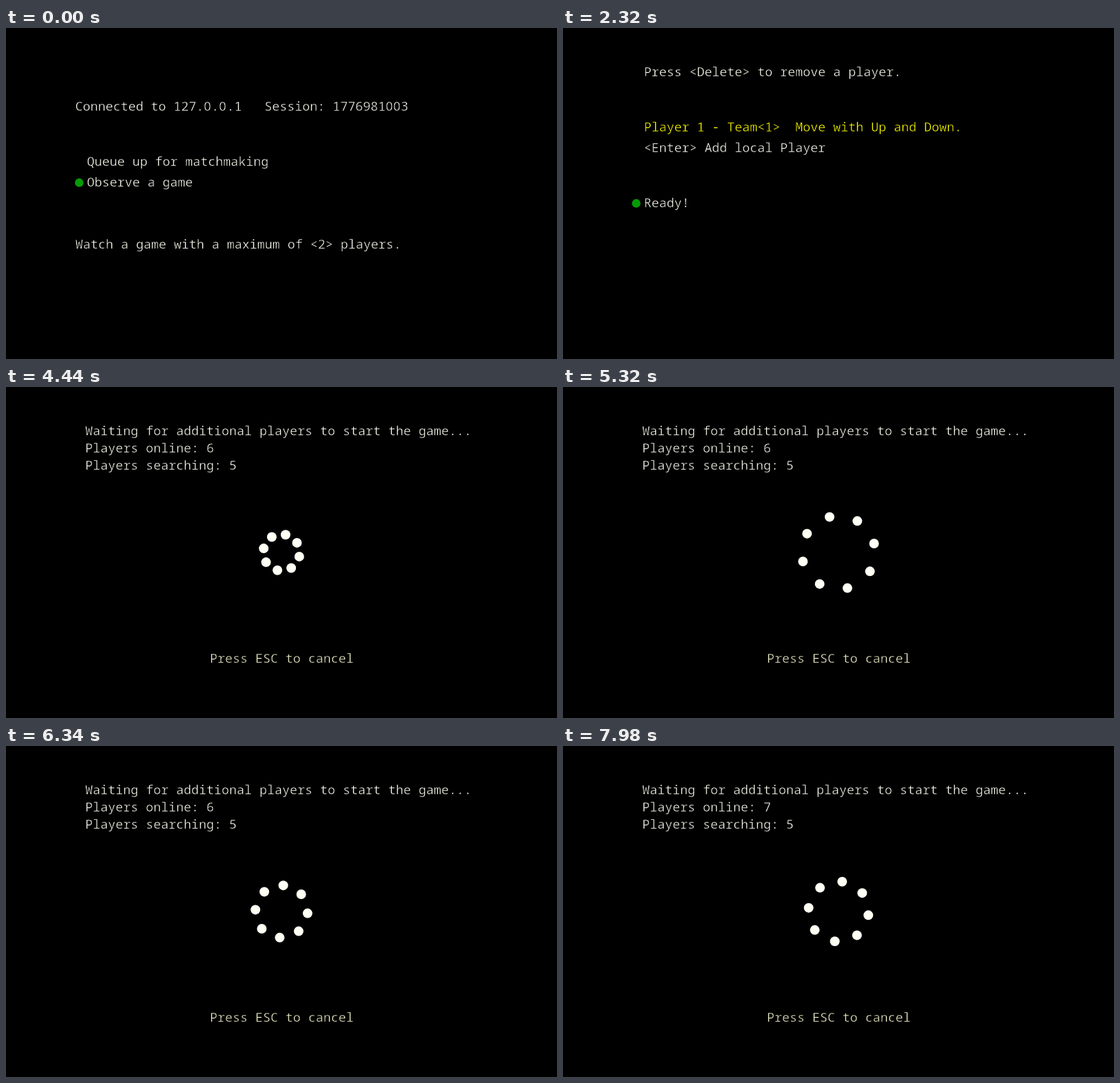
These frames come from a looping animation (800x480 px, 8000 ms). An HTML page:

```html
<!DOCTYPE html>
<html lang="en">
<head>
<meta charset="utf-8">
<title>Match lobby</title>
<style>
  html, body { margin: 0; width: 100%; height: 100%; overflow: hidden; background: #000; }
  svg { display: block; width: 800px; height: 480px; background: #000; }
  /* The black outline thins the letters. */
  text {
    font: 18.33px "Noto Sans Mono", "DejaVu Sans Mono", monospace;
    white-space: pre;
    fill: #fffff4;
    stroke: #000;
    stroke-width: .4px;
    transform: translate(.4px, -.5px);
  }
  /* Plain zero without a slash, spaced to the same 11px cell. */
  .zero { font-family: "Noto Sans", "Open Sans", sans-serif; letter-spacing: .52px; }
  .player { fill: #ff0; }
  .hint { fill: #f2f2cc; }
  .marker { fill: #059c05; }
  #spinner { fill: #fffff4; }
  [data-show] { visibility: hidden; }
</style>
</head>
<body>
<svg viewBox="0 0 800 480">
  <!-- data-show: start and end in ms -->
  <g data-show="0 1420">
    <text x="100" y="120">Connected to 127.<tspan class="zero">0</tspan>.<tspan class="zero">0</tspan>.1   Session: 1776981<tspan class="zero">00</tspan>3</text>
    <text x="117" y="200">Queue up for matchmaking</text>
    <text x="117" y="230">Observe a game</text>
  </g>
  <text x="100.4" y="320" data-show="0 80">Watch a game with a maximum of &lt;2&gt; players.</text>
  <text x="100.4" y="320" data-show="80 1420">Join a match and play with a maximum of &lt;2&gt; players.</text>

  <g data-show="1420 3200">
    <text x="117" y="70">Press &lt;Delete&gt; to remove a player.</text>
    <text x="117" y="150" class="player">Player 1 - Team&lt;1&gt;  Move with Up and Down.</text>
    <text x="117" y="180">&lt;Enter&gt; Add local Player</text>
    <text x="117" y="260">Ready!</text>
  </g>

  <g class="marker">
    <circle cx="106.3" cy="224.3" r="6.2" data-show="0 80"/>
    <circle cx="106.3" cy="194.3" r="6.2" data-show="80 1420"/>
    <circle cx="106.3" cy="144.3" r="6.2" data-show="1420 2140"/>
    <circle cx="106.3" cy="174.3" r="6.2" data-show="2140 2320"/>
    <circle cx="106.3" cy="254.3" r="6.2" data-show="2320 3200"/>
  </g>

  <text x="290" y="70" data-show="3200 3840">Waiting for match...</text>
  <g data-show="3840 8000">
    <text x="114.7" y="70">Waiting for additional players to start the game...</text>
    <text x="114.7" y="95">Players online: <tspan id="online">6</tspan></text>
    <text x="114.7" y="120">Players searching: 5</text>
  </g>
  <g data-show="3200 8000">
    <g id="spinner"></g>
    <text x="295.5" y="400" class="hint">Press ESC to cancel</text>
  </g>
</svg>
<script>
  const LOOP = 8000, STEP = 20, SLOW_FROM = 282, DOTS = 8;
  const spinner = document.getElementById('spinner');
  const online = document.getElementById('online');

  const timed = [...document.querySelectorAll('[data-show]')].map(el => {
    const [from, to] = el.dataset.show.split(' ').map(Number);
    return { el, from, to };
  });

  const dots = Array.from({ length: DOTS }, () => {
    const dot = document.createElementNS('http://www.w3.org/2000/svg', 'circle');
    dot.setAttribute('r', 7);
    return spinner.appendChild(dot);
  });

  // The spinner skips every fifth step once it starts to lag.
  function spinnerSteps(t) {
    const step = Math.floor(t / STEP);
    const late = step - SLOW_FROM;
    return late > 0 ? SLOW_FROM + Math.floor((4 * late + 1) / 5) : step;
  }

  function drawSpinner(t) {
    const phase = 0.05 * spinnerSteps(t) - 5.938;
    const radius = 40 + 15 * Math.sin(phase);
    dots.forEach((dot, i) => {
      const angle = phase / 2 + i * 2 * Math.PI / DOTS;
      dot.setAttribute('cx', (400 + radius * Math.sin(angle)).toFixed(2));
      dot.setAttribute('cy', (240 - radius * Math.cos(angle)).toFixed(2));
    });
  }

  function draw(now) {
    const t = now % LOOP;
    for (const { el, from, to } of timed) {
      el.style.visibility = t >= from && t < to ? 'visible' : 'hidden';
    }
    online.textContent = t < 6880 ? '6' : '7';
    drawSpinner(t);
  }

  const start = performance.now();
  function tick() {
    draw(performance.now() - start);
    requestAnimationFrame(tick);
  }
  tick();
</script>
</body>
</html>
```
